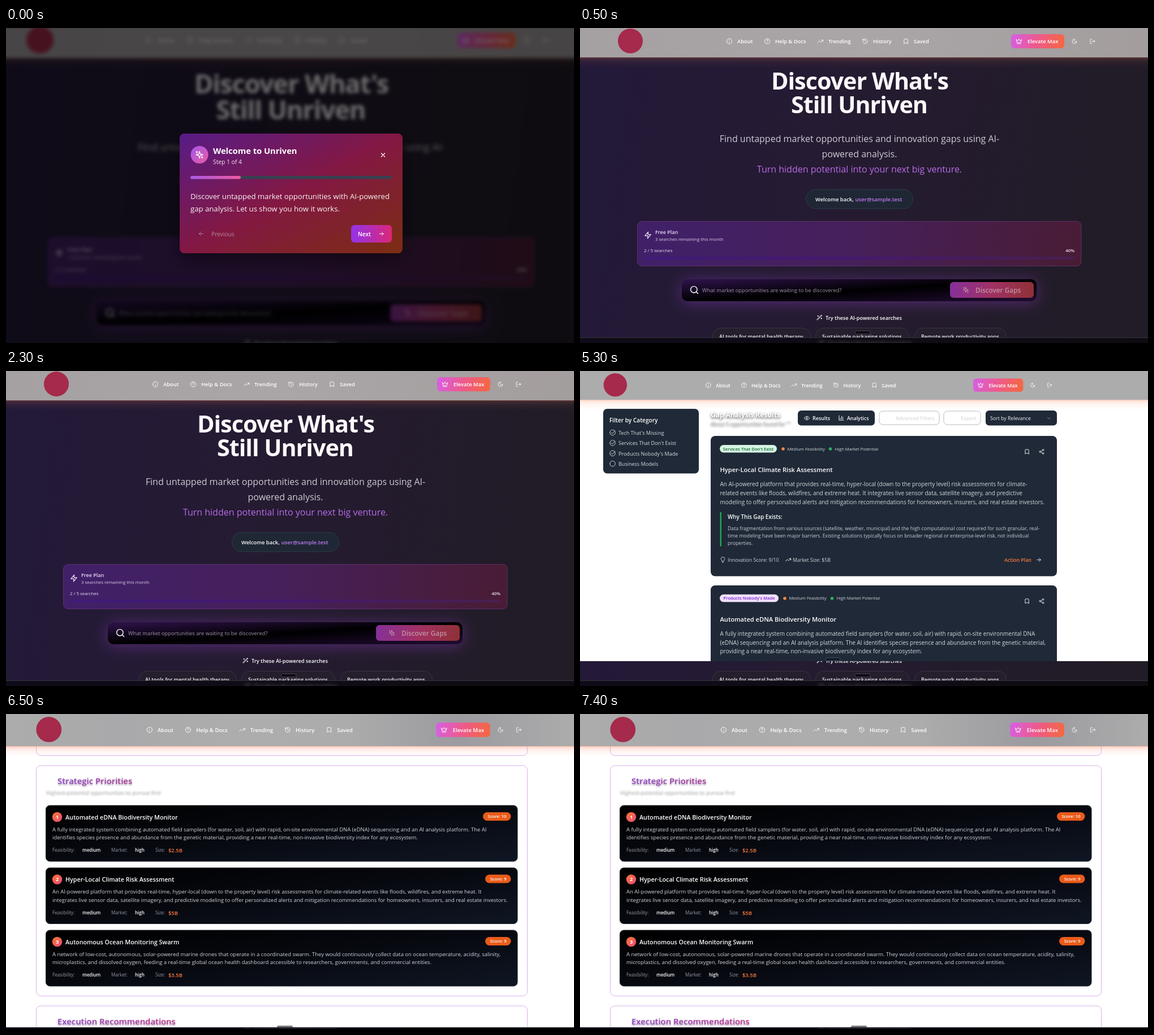
These frames come from a looping animation (1004x558 px, 8 s). An HTML page with a canvas:

```html
<!DOCTYPE html>
<html lang="en">
<head>
<meta charset="utf-8">
<title>Gap finder tour</title>
<style>
html, body { margin: 0; width: 100%; height: 100%; overflow: hidden; background: #0e0b13; }
canvas { display: block; }
</style>
</head>
<body>
<canvas id="stage" width="1004" height="558"></canvas>
<script>
const W = 1004, H = 558, LOOP = 8000;
const BRAND = 'Unriven', FONT = '"Open Sans", "Noto Sans", sans-serif';
const stage = document.getElementById('stage').getContext('2d');
let c = stage;

// Line icons on a 24 unit grid
const RING = 'M2 12a10 10 0 1 0 20 0a10 10 0 1 0-20 0';
const ICONS = {
  info: RING + 'M12 16v-4M12 8h.01',
  help: RING + 'M9 9a3 3 0 0 1 6 1c0 2-3 3-3 3M12 17h.01',
  ring: RING,
  check: RING + 'M7 12l4 4 10-11',
  trend: 'M22 7L13.5 15.5 8.5 10.5 2 17M16 7h6v6',
  history: 'M3 12a9 9 0 1 0 9-9a9.7 9.7 0 0 0-6.7 2.7L3 8M3 3v5h5M12 7v5l4 2',
  bookmark: 'M19 21l-7-4-7 4V5a2 2 0 0 1 2-2h10a2 2 0 0 1 2 2z',
  crown: 'M2 5l5 6 5-8 5 8 5-6-3 12H5zM5 21h14',
  moon: 'M12 3a6 6 0 0 0 9 9a9 9 0 1 1-9-9z',
  exit: 'M9 21H5a2 2 0 0 1-2-2V5a2 2 0 0 1 2-2h4M16 17l5-5-5-5M21 12H9',
  zap: 'M13 2L3 14h9l-1 8L21 10h-9z',
  search: 'M3 11a8 8 0 1 0 16 0a8 8 0 1 0-16 0M21 21l-4.3-4.3',
  spark: 'M12 3l2 7 7 2-7 2-2 7-2-7-7-2 7-2zM5 3v4M3 5h4M19 17v4M17 19h4',
  wand: 'M3 19L16 6l2 2L5 21zM13 9l2 2M20 2v4M18 4h4M7 4v4M5 6h4M20 13v4M18 15h4',
  eye: 'M2 12c5-9 15-9 20 0c-5 9-15 9-20 0M9 12a3 3 0 1 0 6 0a3 3 0 1 0-6 0',
  chart: 'M3 3v18h18M8 17v-4M13 17V5M18 17V9',
  chevron: 'M5 9l7 7 7-7',
  share: 'M15 5a3 3 0 1 0 6 0a3 3 0 1 0-6 0M3 12a3 3 0 1 0 6 0a3 3 0 1 0-6 0M15 19a3 3 0 1 0 6 0a3 3 0 1 0-6 0M8.6 13.5l6.8 4M15.4 6.5l-6.8 4',
  bulb: 'M9 18h6M10 22h4M9 17c0-4-4-4-4-9a7 7 0 0 1 14 0c0 5-4 5-4 9',
  right: 'M4 12h16M13 5l7 7-7 7',
  left: 'M20 12H4M11 5l-7 7 7 7',
  close: 'M5 5l14 14M19 5L5 19'
};

function icon(name, x, y, size, color = '#fff', weight = 2) {
  c.save();
  c.translate(x - size / 2, y - size / 2);
  c.scale(size / 24, size / 24);
  c.strokeStyle = color;
  c.lineWidth = weight;
  c.lineCap = c.lineJoin = 'round';
  c.stroke(new Path2D(ICONS[name]));
  c.restore();
}

// y is the middle of the capitals
function text(str, x, y, size, color = '#fff', weight = 400, align = 'left') {
  c.font = `${weight} ${size}px ${FONT}`;
  c.textAlign = align;
  c.fillStyle = color;
  c.fillText(str, x, y + size * 0.36);
}

function lines(list, x, y, step, size, color) {
  list.forEach((line, i) => text(line, x, y + i * step, size, color));
}

function box(x0, y0, x1, y1, r, fill, border) {
  c.beginPath();
  c.roundRect(x0, y0, x1 - x0, y1 - y0, r);
  if (fill) { c.fillStyle = fill; c.fill(); }
  if (border) { c.strokeStyle = border; c.lineWidth = 1; c.stroke(); }
}

function dot(x, y, r, fill) {
  c.beginPath();
  c.arc(x, y, r, 0, 7);
  c.fillStyle = fill;
  c.fill();
}

function grad(x0, y0, x1, y1, ...colors) {
  const g = c.createLinearGradient(x0, y0, x1, y1);
  colors.forEach((color, i) => g.addColorStop(i / (colors.length - 1), color));
  return g;
}

// Like CSS "to bottom right": the other two corners share the middle colour
function cornerGrad(x0, y0, x1, y1, ...colors) {
  const w = x1 - x0, h = y1 - y0, k = w * h / (w * w + h * h);
  const cx = (x0 + x1) / 2, cy = (y0 + y1) / 2;
  return grad(cx - h * k, cy - w * k, cx + h * k, cy + w * k, ...colors);
}

function shadowed(color, blur, dy, draw) {
  c.save();
  c.shadowColor = color;
  c.shadowBlur = blur;
  c.shadowOffsetY = dy;
  draw();
  c.restore();
}

function header(x, y, scale, height, fill, glow) {
  c.fillStyle = grad(0, height, 0, height + 18, `rgba(${glow},.35)`, `rgba(${glow},.1)`, `rgba(${glow},0)`);
  c.fillRect(0, height, W, 18);
  c.fillStyle = `rgba(${glow},.35)`;
  c.fillRect(0, height, W, 1.5);
  c.fillStyle = fill;
  c.fillRect(0, 0, W, height);
  c.save();
  c.translate(x, y);
  c.scale(scale, scale);
  dot(-189, -1, 22, '#a52a4b');
  const nav = [['info', 'About', 0], ['help', 'Help & Docs', 67], ['trend', 'Trending', 161],
    ['history', 'History', 240], ['bookmark', 'Saved', 312]];
  for (const [name, label, dx] of nav) {
    icon(name, dx - 14, -0.5, 11);
    text(label, dx, 0, 9.4, '#fff', 600);
  }
  box(484, -13, 578, 12, 6, grad(484, -13, 578, 12, '#d65fe6', '#ee5a8a', '#f5683c'));
  icon('crown', 498, -0.5, 11);
  text('Elevate Max', 513, 0, 9.4, '#fff', 600);
  icon('moon', 596, -0.5, 10.5);
  icon('exit', 628, -0.5, 10.5);
  c.restore();
}

function home() {
  c.fillStyle = grad(0, 0, W, 140, '#231939', '#251b31', '#211c26');
  c.fillRect(0, 0, W, H);
  header(278, 24, 1, 52, grad(0, 0, W, 0, '#a5a0a2', '#aaa5a6', '#a39d9e'), '140,75,65');

  c.letterSpacing = '-1px';
  text("Discover What's", 494.5, 94, 41.3, '#fdf8fa', 700, 'center');
  text('Still ' + BRAND, 493.5, 136, 41.3, '#fdf8fa', 700, 'center');
  c.letterSpacing = '0px';
  text('Find untapped market opportunities and innovation gaps using AI-', 494, 196, 16, '#cfcad3', 400, 'center');
  text('powered analysis.', 494, 223.5, 16, '#cfcad3', 400, 'center');
  text('Turn hidden potential into your next big venture.', 494, 250.5, 16, '#b96be8', 400, 'center');

  box(399.5, 286, 588.5, 320, 17, '#1f2735', '#2b3f46');
  text('Welcome back,', 416, 304, 9.4, '#fff', 600);
  text('user@sample.test', 486.5, 304, 9.6, '#c07cf2', 600);

  box(101.5, 342.5, 886, 421.5, 8, grad(101, 342, 886, 421, '#412069', '#46205a', '#491c34'), '#5d2f68');
  icon('zap', 120, 367, 14, '#f1e6fa');
  text('Free Plan', 133, 362, 9, '#e8d9f7', 600);
  text('3 searches remaining this month', 133, 374, 7.9, '#dccdea');
  text('2 / 5 searches', 113, 394, 7.9, '#e8dcf2');
  text('40%', 874, 394, 7.9, '#f0e3f2', 600, 'right');
  box(113, 405, 874, 410, 2.5, grad(113, 0, 874, 0, '#401b78', '#43196f', '#481f4e'));

  shadowed('rgba(125,55,170,.55)', 26, 3, () =>
    box(180, 445, 807, 484, 10, cornerGrad(180, 445, 807, 484, '#30134c', '#000', '#200c33')));
  icon('search', 202, 464, 17);
  text('What market opportunities are waiting to be discovered?', 216, 464.5, 9.35, '#9a95a5');
  box(654, 450, 802, 478, 6, grad(654, 450, 802, 478, '#85309b', '#a03163', '#8f3135'));
  icon('spark', 682, 464, 12, '#bd95ab');
  text('Discover Gaps', 699, 464.5, 11.8, '#c093a3', 600);

  icon('wand', 423, 513, 11);
  text('Try these AI-powered searches', 434, 513.5, 9.2, '#fff', 600);
  const chips = [['AI tools for mental health therapy', 234, 408],
    ['Sustainable packaging solutions', 416, 582], ['Remote work productivity apps', 591, 754]];
  for (const [label, x0, x1] of chips) {
    box(x0 + 0.5, 531.5, x1 - 0.5, 563, 15, '#251e2c', '#3a3342');
    text(label, x0 + 12, 547, 9.15, '#f4f0f5', 600);
  }
  box(486, 536.5, 513, 542, 3, '#0c0a10', '#4a4452');
  c.fillStyle = '#3a3542';
  c.fillRect(0, 548, W, 1);
  c.fillStyle = '#0f0c16';
  c.fillRect(0, 549, W, 2);
}

const homeLayer = document.createElement('canvas');
homeLayer.width = W;
homeLayer.height = H;

function welcome() {
  c = homeLayer.getContext('2d');
  home();
  c = stage;
  c.save();
  c.filter = 'blur(3px)';
  c.drawImage(homeLayer, -37.5, -4, W * 1.096, H * 1.096);
  c.restore();
  c.fillStyle = 'rgba(0,0,0,.57)';
  c.fillRect(0, 0, W, H);

  shadowed('rgba(0,0,0,.45)', 30, 10, () =>
    box(307, 187, 701, 399, 8, cornerGrad(307, 187, 701, 399, '#581c87', '#831843', '#7c2d12')));
  dot(342, 224.5, 15.5, grad(327, 209, 357, 240, '#a058e8', '#ee5ba6'));
  icon('spark', 342, 224.5, 16);
  text('Welcome to ' + BRAND, 366, 218, 14.7, '#fff', 700);
  text('Step 1 of 4', 366, 237, 10.3, '#f3e6f0');
  icon('close', 666.5, 225, 10.5, '#fff', 3);
  box(326, 262, 682, 267.5, 3, '#374151');
  box(326, 262, 415, 267.5, 3, grad(326, 0, 415, 0, '#a85be6', '#f0599f'));
  lines(['Discover untapped market opportunities with AI-powered',
    'gap analysis. Let us show you how it works.'], 326, 298, 22.5, 13.15, '#fbf4f8');
  icon('left', 345, 364.5, 11, '#b58a9c');
  text('Previous', 363, 365, 10.2, '#b58a9c', 500);
  box(610, 349, 682, 380, 6, grad(610, 0, 682, 0, '#9333ea', '#db2777'));
  text('Next', 622, 365, 10, '#fff', 600);
  icon('right', 663.5, 364.5, 11);
}

const CLIMATE = 'Hyper-Local Climate Risk Assessment', EDNA = 'Automated eDNA Biodiversity Monitor';
const SLATE = '#1f2937';

function resultCard(y, label, badgeEnd, badgeFill, badgeInk, title, body) {
  box(231, y, 843, y + 248.5, 8, SLATE);
  box(247, y + 16, badgeEnd, y + 29.5, 6.7, badgeFill);
  text(label, (247 + badgeEnd) / 2, y + 23, 7.6, badgeInk, 600, 'center');
  dot(badgeEnd + 11, y + 23, 2.8, '#f5853f');
  text('Medium Feasibility', badgeEnd + 18.5, y + 23, 7.6, '#d1d5db');
  dot(badgeEnd + 94.5, y + 23, 2.8, '#2fae5f');
  text('High Market Potential', badgeEnd + 102.5, y + 23, 7.6, '#d1d5db');
  icon('bookmark', 790, y + 28, 10.5);
  icon('share', 816, y + 28, 10.5);
  text(title, 247.5, y + 60, 11.1, '#fff', 600);
  lines(body, 247.5, y + 85.5, 15.8, 9.98, '#d3d7dd');
}

function results() {
  c.fillStyle = '#fff';
  c.fillRect(0, 0, W, H);
  header(240, 25.5, 0.94, 51, '#acacac', '255,165,135');

  box(41, 67, 210, 181.5, 7, SLATE);
  text('Filter by Category', 52, 87, 10.1, '#fff', 600);
  ['Tech That\'s Missing', 'Services That Don\'t Exist', 'Products Nobody\'s Made', 'Business Models']
    .forEach((label, i) => {
      icon(i < 3 ? 'check' : 'ring', 57.5, 109 + i * 18.4, 11.5, '#e5e7eb', 1.8);
      text(label, 68, 109.5 + i * 18.4, 9.03, '#d7dbe1');
    });

  shadowed('rgba(0,0,0,.75)', 4, 1.5, () => {
    text('Gap Analysis Results', 231, 78, 12, '#fff', 700);
    text('About 5 opportunities found for ""', 231, 93.5, 8.85, '#d6d6da');
  });

  box(385, 70, 521, 96.5, 6, SLATE);
  icon('eye', 401, 83.5, 11);
  text('Results', 411, 84, 8.9, '#fff', 600);
  icon('chart', 462, 83, 11);
  text('Analytics', 472, 84, 8.9, '#fff', 600);
  box(529, 71, 635, 95, 6, '#fff', '#b9bcc4');
  text('Advanced Filters', 558, 84, 9, '#ced1d8');
  box(643, 71, 708, 95, 6, '#fff', '#b9bcc4');
  text('Export', 673, 84, 9, '#ced1d8');
  box(717, 70, 843, 96.5, 6, SLATE);
  text('Sort by Relevance', 725, 84, 8.75, '#f3f4f6');
  icon('chevron', 829, 83.5, 9, '#9ca3af');

  resultCard(115, "Services That Don't Exist", 348, '#d5f5e3', '#166534', CLIMATE, [
    'An AI-powered platform that provides real-time, hyper-local (down to the property level) risk assessments for climate-',
    'related events like floods, wildfires, and extreme heat. It integrates live sensor data, satellite imagery, and predictive',
    'modeling to offer personalized alerts and mitigation recommendations for homeowners, insurers, and real estate investors.']);
  c.fillStyle = '#23a455';
  c.fillRect(247.5, 250, 2.5, 60.5);
  text('Why This Gap Exists:', 261, 258.5, 9.85, '#fff', 600);
  lines(['Data fragmentation from various sources (satellite, weather, municipal) and the high computational cost required for such granular, real-',
    'time modeling have been major barriers. Existing solutions typically focus on broader regional or enterprise-level risk, not individual',
    'properties.'], 261, 278.5, 13.1, 8.7, '#c9ced6');
  icon('bulb', 252.5, 334.5, 11, '#d1d5db');
  text('Innovation Score: 9/10', 261, 335, 8.7, '#d1d5db');
  icon('trend', 368, 334.5, 11);
  text('Market Size: $5B', 376, 335, 8.7, '#d1d5db');
  text('Action Plan', 750, 335, 8.8, '#fb7a3c', 600);
  icon('right', 811, 334.5, 10);

  resultCard(379.7, "Products Nobody's Made", 351, '#efe0fd', '#7e22ce', EDNA, [
    'A fully integrated system combining automated field samplers (for water, soil, air) with rapid, on-site environmental DNA',
    '(eDNA) sequencing and an AI analysis platform. The AI identifies species presence and abundance from the genetic material,',
    'providing a near real-time, non-invasive biodiversity index for any ecosystem.']);
  box(434, 508, 460, 513, 2.5, '#111827', '#4b5563');
}

function priority(i, title, score, size, body) {
  const y = 162 + i * 110.5;
  box(70.5, y, 904, y + 99, 7, cornerGrad(70, y, 904, y + 99, '#000', '#070910', '#0f1623'), '#1c2028');
  dot(90.5, y + 20.5, 8.7, grad(82, y + 12, 99, y + 29, '#f9762a', '#ec4a7d'));
  text(i + 1, 90.5, y + 20.5, 9.2, '#fff', 700, 'center');
  text(title, 105, y + 21, 10.73, '#fff', 600);
  box(score > 9 ? 843 : 847, y + 12, 892.5, y + 27, 7.5, '#ea5b1a');
  text('Score: ' + score, 884.5, y + 19.5, 7.65, '#fff', 600, 'right');
  lines(body, 82, y + 42.5, 14.4, 9.45, '#d0d4da');
  const facts = [['Feasibility:', 82, 'medium', 135], ['Market:', 186, 'high', 228]];
  for (const [key, kx, value, vx] of facts) {
    text(key, kx, y + 79.5, 8.1, '#9298a3');
    text(value, vx, y + 79.5, 8, '#fff', 600);
  }
  text('Size:', 264, y + 79.5, 8.1, '#9298a3');
  text(size, 287, y + 80, 9.4, '#fb7a3c', 600);
}

function strategy() {
  c.fillStyle = '#fff';
  c.fillRect(0, 0, W, H);
  const edge = '#dcaef0';
  box(53.5, 20, 921.5, 73.5, 8, '#fff', edge);
  box(53.5, 91.5, 921.5, 499.5, 8, '#fff', edge);
  box(53.5, 517, 921.5, 600, 8, '#fff', edge);
  header(268, 28.5, 1.017, 57, grad(0, 0, W, 0, '#acacac', '#a9a9ab', '#adadad', '#acacac', '#9b9ba0', '#acacac'),
    '255,145,115');

  shadowed('rgba(60,20,80,.5)', 3, 1.5, () => {
    text('Strategic Priorities', 91, 119, 14.9, grad(91, 0, 224, 0, '#8d45c4', '#a83c94'), 600);
    text('Execution Recommendations', 91, 545, 14.9, grad(91, 0, 305, 0, '#8d45c4', '#c2368a'), 600);
  });
  shadowed('rgba(0,0,0,.5)', 3, 1, () =>
    text('Highest-potential opportunities to pursue first', 71, 139, 9.46, '#f1f1f3'));

  priority(0, EDNA, 10, '$2.5B', [
    'A fully integrated system combining automated field samplers (for water, soil, air) with rapid, on-site environmental DNA (eDNA) sequencing and an AI analysis platform. The AI',
    'identifies species presence and abundance from the genetic material, providing a near real-time, non-invasive biodiversity index for any ecosystem.']);
  priority(1, CLIMATE, 9, '$5B', [
    'An AI-powered platform that provides real-time, hyper-local (down to the property level) risk assessments for climate-related events like floods, wildfires, and extreme heat. It',
    'integrates live sensor data, satellite imagery, and predictive modeling to offer personalized alerts and mitigation recommendations for homeowners, insurers, and real estate investors.']);
  priority(2, 'Autonomous Ocean Monitoring Swarm', 9, '$3.5B', [
    'A network of low-cost, autonomous, solar-powered marine drones that operate in a coordinated swarm. They would continuously collect data on ocean temperature, acidity, salinity,',
    'microplastics, and dissolved oxygen, feeding a real-time global ocean health dashboard accessible to researchers, governments, and commercial entities.']);
  box(479, 552, 507, 558, 2, '#7b7b80');
  c.fillStyle = '#15121c';
  c.fillRect(0, 555, W, 2);
}

// Each view covers only its upper part; the views before it stay below
const views = [
  { at: 0, height: H, draw: welcome },
  { at: 500, height: 551, draw: home },
  { at: 3500, height: 514, draw: results },
  { at: 6500, height: 556, draw: strategy }
];
let shown = -1;

function frame(now) {
  const t = now % LOOP;
  const current = views.filter(v => v.at <= t).length - 1;
  if (current !== shown) {
    shown = current;
    for (const view of views.slice(0, current + 1)) {
      c.save();
      c.beginPath();
      c.rect(0, 0, W, view.height);
      c.clip();
      view.draw();
      c.restore();
    }
  }
  requestAnimationFrame(frame);
}
requestAnimationFrame(frame);
</script>
</body>
</html>
```
